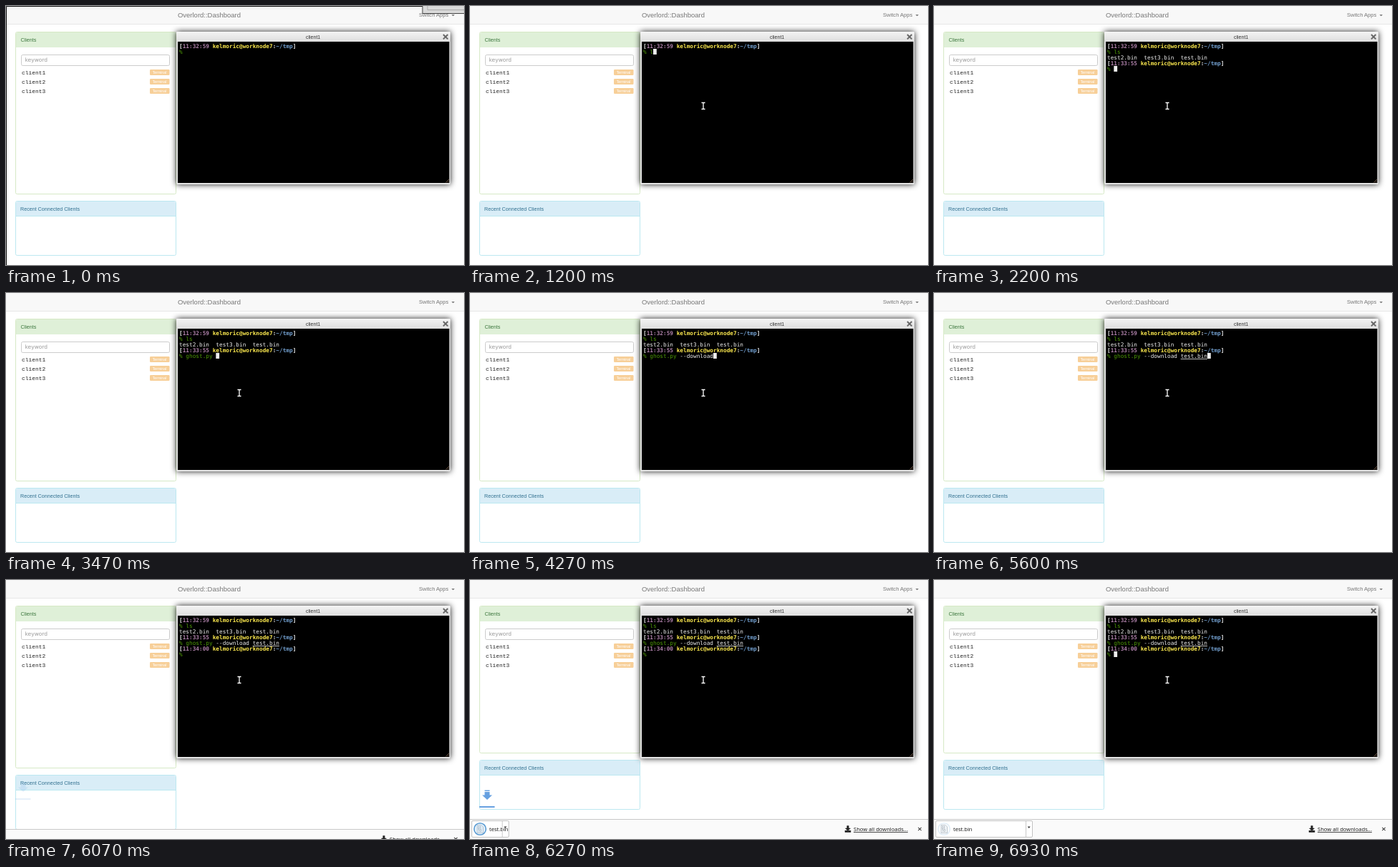
Write an HTML page that moves like this. It is 640 by 363 pixels and loops after 6.99 s.

```html
<!DOCTYPE html>
<html lang="en">
<head>
<meta charset="utf-8">
<title>Dashboard terminal</title>
<style>
  html, body { margin: 0; width: 100%; height: 100%; overflow: hidden; background: #fff; }
  svg { display: block; width: 640px; height: 363px; }
  text { font-family: "Liberation Sans", Arial, sans-serif; font-size: 7.15px; white-space: pre; }
  .mono { font-family: "Liberation Mono", monospace; font-size: 7.9px; fill: #222; }
  .term text { font-family: "DejaVu Sans Mono", monospace; font-size: 7.75px; fill: #eee; }
  .term .b { font-weight: bold; }
  .shelf text { font-family: "Open Sans", "Noto Sans", sans-serif; font-size: 7.6px; fill: #111; }
  .window { filter: drop-shadow(0 0 4px rgba(0, 0, 0, .9)); }
</style>
</head>
<body>
<svg viewBox="0 0 640 363">
  <defs>
    <linearGradient id="bar" x2="0" y2="1">
      <stop stop-color="#f4f4f4"/><stop offset="1" stop-color="#dedede"/>
    </linearGradient>
    <clipPath id="itemClip"><rect id="clipBox" x="2" y="336" width="136" height="26"/></clipPath>
  </defs>
  <rect width="640" height="363" fill="#fff"/>
  <rect width="640" height="25" fill="#f8f8f8"/>
  <rect y="25" width="640" height="1" fill="#e7e7e7"/>
  <text x="240" y="15.6" fill="#777" style="font-size:9.48px">Overlord::Dashboard</text>
  <text x="577" y="15" fill="#777" style="font-size:7.6px">Switch Apps</text>
  <path d="M622.5 12h4.5l-2.2 2.3z" fill="#777"/>

  <rect id="clients" x="13.5" y="36.5" width="224" height="227" rx="2" fill="#fff" stroke="#d6e9c6"/>
  <path d="M14 58V39q0-2 2-2H235q2 0 2 2V58z" fill="#dff0d8"/>
  <text x="20.5" y="49.6" fill="#3c763d">Clients</text>
  <rect x="21.5" y="68.5" width="207" height="15" rx="2" fill="#fff" stroke="#ccc"/>
  <text x="26.5" y="78.3" fill="#999" style="font-family:'DejaVu Sans',sans-serif;font-size:7.5px">keyword</text>
  <g id="clientRows"></g>

  <g id="recent">
    <rect id="recentBox" x="13.5" y="273.5" width="224" height="76" rx="2" fill="#fff" stroke="#bce8f1"/>
    <path d="M14 294.5V276q0-2 2-2H235q2 0 2 2V294.5z" fill="#d9edf7"/>
    <path d="M14 294.5H237" stroke="#bce8f1"/>
    <text x="20" y="287" fill="#31708f">Recent Connected Clients</text>
  </g>

  <g class="window">
    <rect x="238" y="36" width="383" height="214" rx="1.5" fill="#e6e6e6"/>
  </g>
  <rect x="238" y="36" width="383" height="14" rx="1.5" fill="url(#bar)"/>
  <text x="419" y="45.6" fill="#333" style="font-size:7px">client1</text>
  <path d="M611 40l6.4 6.4M617.4 40l-6.4 6.4" stroke="#666" stroke-width="2"/>
  <rect x="240" y="50" width="379.5" height="198" fill="#000"/>
  <path d="M614.5 247.5l4.5-4.5M617 247.5l2-2" stroke="#8a6a55" stroke-width=".8"/>
  <g id="term" class="term"></g>
  <g id="ibeam" fill="none">
    <path d="M323.5 135.5h1.7l.8.8.8-.8h1.7M326 136v8M323.5 144.5h1.7l.8-.8.8.8h1.7" stroke="#fff" stroke-width="1.3"/>
  </g>

  <g id="arrow" fill="#659fe0">
    <path d="M20.5-23.5h7v1.4h-7zM20.5-21h7v4.5h3.5L24-10l-7-6.5h3.5z"/>
    <rect x="13" y="-1" width="21.5" height="2"/>
  </g>

  <g id="shelf" class="shelf">
    <rect y="335" width="640" height="28" fill="#fafafa"/>
    <rect y="335" width="640" height="1" fill="#c8c8c8"/>
    <path d="M526.8 344.5h2.4v3.5h2.3l-3.5 3.6-3.5-3.6h2.3zM524 351v2.5h8V351" fill="#222" stroke="#222" stroke-width=".5"/>
    <text x="536" y="352" text-decoration="underline">Show all downloads...</text>
    <path d="M626.3 346.8l4.4 4.4M630.7 346.8l-4.4 4.4" stroke="#444" stroke-width="1.1"/>
    <g id="item">
      <rect id="itemBox" x="2.5" y="337.5" width="135" height="23" rx="1.5" fill="#fff" stroke="#c2c2c2"/>
      <g clip-path="url(#itemClip)">
        <path d="M10 343.5h6l2.5 2.5v8.5H10z" fill="#f4f6f8" stroke="#a9b2ba" stroke-width=".7"/>
        <text x="11" y="348.7" style="font-size:4.4px;fill:#7c8791">01</text>
        <text x="11" y="353.2" style="font-size:4.4px;fill:#7c8791">10</text>
        <circle id="ring" cx="14" cy="349" r="8.3" fill="#8fc3ee" fill-opacity=".22" stroke="#5a9bd2" stroke-width="1.6"/>
        <text x="27" y="352">test.bin</text>
      </g>
      <g id="drop">
        <path d="M-8.5 338V360" stroke="#c8c8c8"/>
        <path d="M-6.3 345.5h4l-2 2.4z" fill="#333"/>
      </g>
    </g>
  </g>

  <g id="menu">
    <path d="M.5 363V.5H640" fill="none" stroke="#111"/>
    <rect x="582" y="-2" width="60" height="12.5" fill="#d9d9d9" stroke="#444"/>
    <path d="M589 0V5.5H640" fill="none" stroke="#aaa"/>
  </g>
</svg>
<script>
const LOOP = 6990, FPS = 15;
const CELL = 4.666, LEFT = 242, TOP = 52, ROW = 8;
const GREEN = '#4e9a06';
const $ = id => document.getElementById(id);
const clamp = x => Math.max(0, Math.min(1, x));
const show = (id, on) => $(id).setAttribute('visibility', on ? 'visible' : 'hidden');
const set = (id, attrs) => {
  for (const name in attrs) $(id).setAttribute(name, attrs[name]);
};

$('clientRows').innerHTML = [1, 2, 3].map((n, i) => `
  <g transform="translate(0 ${i * 13})">
    <text class="mono" x="22" y="96">client${n}</text>
    <rect x="201" y="89" width="27.5" height="8" rx="1.2" fill="#f7cf98"/>
    <text x="204.7" y="94.9" fill="#fff" style="font-size:5.2px">Terminal</text>
  </g>`).join('');

const spread = (from, to, n) => Array.from({ length: n }, (_, i) => from + (to - from) * i / (n - 1));
const LS_KEYS = [1200, 1530];
const COMMAND = 'ghost.py --download test.bin';
const COMMAND_KEYS = [
  ...spread(2670, 3330, 8), 3470, 3530,
  ...spread(3670, 4330, 10), 4530, 4800,
  ...spread(5070, 5530, 6)
];
const typed = (text, keys, t) => text.slice(0, keys.filter(k => k <= t).length);

const span = (text, color = '#eee', extra = '') => `<tspan fill="${color}" ${extra}>${text}</tspan>`;
const prompt = time => `<tspan class="b">${span('[')}${span(time, '#ad7fa8')} ${
  span('kelmoric@worknode7', '#fce94f')}${span(':')}${span('~/tmp', '#729fcf')}${span(']')}</tspan>`;
const input = html => span('% ', GREEN) + html;

function commandHtml(text) {
  const path = text.slice(20);
  return input(span(text.slice(0, 8), GREEN) + span(text.slice(8, 20)) +
    (path && span(path, '#eee', 'text-decoration="underline"')));
}

function caretAt(t, ls, command) {
  if (t < 470) return null;
  if (t < 1670) return [1, 2 + ls.length];
  if (t < 2200) return null;
  if (t < 5670) return [4, 2 + command.length];
  if (t < 5930) return [5, 0];
  return t < 6330 ? null : [6, 2];
}

let lastTerm = '';
function drawTerminal(t) {
  const ls = typed('ls', LS_KEYS, t);
  const command = typed(COMMAND, COMMAND_KEYS, t);
  const lines = [
    [0, prompt('11:32:59')],
    [0, input(span(ls, GREEN))],
    [1730, span('test2.bin  test3.bin  test.bin')],
    [1800, prompt('11:33:55')],
    [1870, commandHtml(command)],
    [5930, prompt('11:34:00')],
    [6000, input('')]
  ];
  let html = lines.map(([from, line], i) =>
    t < from ? '' : `<text x="${LEFT}" y="${TOP + 7 + i * ROW}">${line}</text>`).join('');
  const caret = caretAt(t, ls, command);
  if (caret) {
    html += `<rect x="${LEFT + caret[1] * CELL}" y="${TOP + caret[0] * ROW}" width="4.8" height="8" fill="#eee"/>`;
  }
  if (html !== lastTerm) $('term').innerHTML = lastTerm = html;
}

function drawPage(t) {
  const shrunk = t >= 6200;
  set('clients', { height: shrunk ? 206 : 227 });
  set('recent', { transform: `translate(0 ${shrunk ? -21 : 0})` });
  set('recentBox', { height: shrunk ? 69 : 76 });
  set('menu', { opacity: t < 70 ? 1 : clamp((330 - t) / 330) });
  show('ibeam', t >= 470);
}

function drawDownload(t) {
  const fall = clamp((t - 5992) / 600);
  set('arrow', {
    opacity: (1 - Math.cos(fall * 2 * Math.PI)) / 2,
    transform: `translate(0 ${318 + (fall - .463) * 33})`
  });

  const rise = clamp((t - 6000) / 140);
  show('shelf', rise > 0);
  set('shelf', { transform: `translate(0 ${28 * (1 - rise)})` });

  const grow = 1 - (1 - clamp((t - 6180) / 420)) ** 2;
  const width = 135 * grow;
  $('item').style.display = grow > 0 ? '' : 'none';
  set('itemBox', { width });
  set('clipBox', { width: width + 1 });
  set('drop', { transform: `translate(${2 + width} 0)` });
  set('ring', { opacity: 1 - .82 * clamp((t - 6530) / 400) });
}

const start = performance.now();
function frame(now) {
  const elapsed = Math.max(0, now - start) % LOOP;
  const tick = Math.floor((elapsed + 4) * FPS / 1000);
  let t = Math.round(tick * 100 / FPS) * 10;
  if (t > 6070 && t < 6200) t = 6070;
  drawTerminal(t);
  drawPage(t);
  drawDownload(t);
  requestAnimationFrame(frame);
}
frame(start);
</script>
</body>
</html>
```
